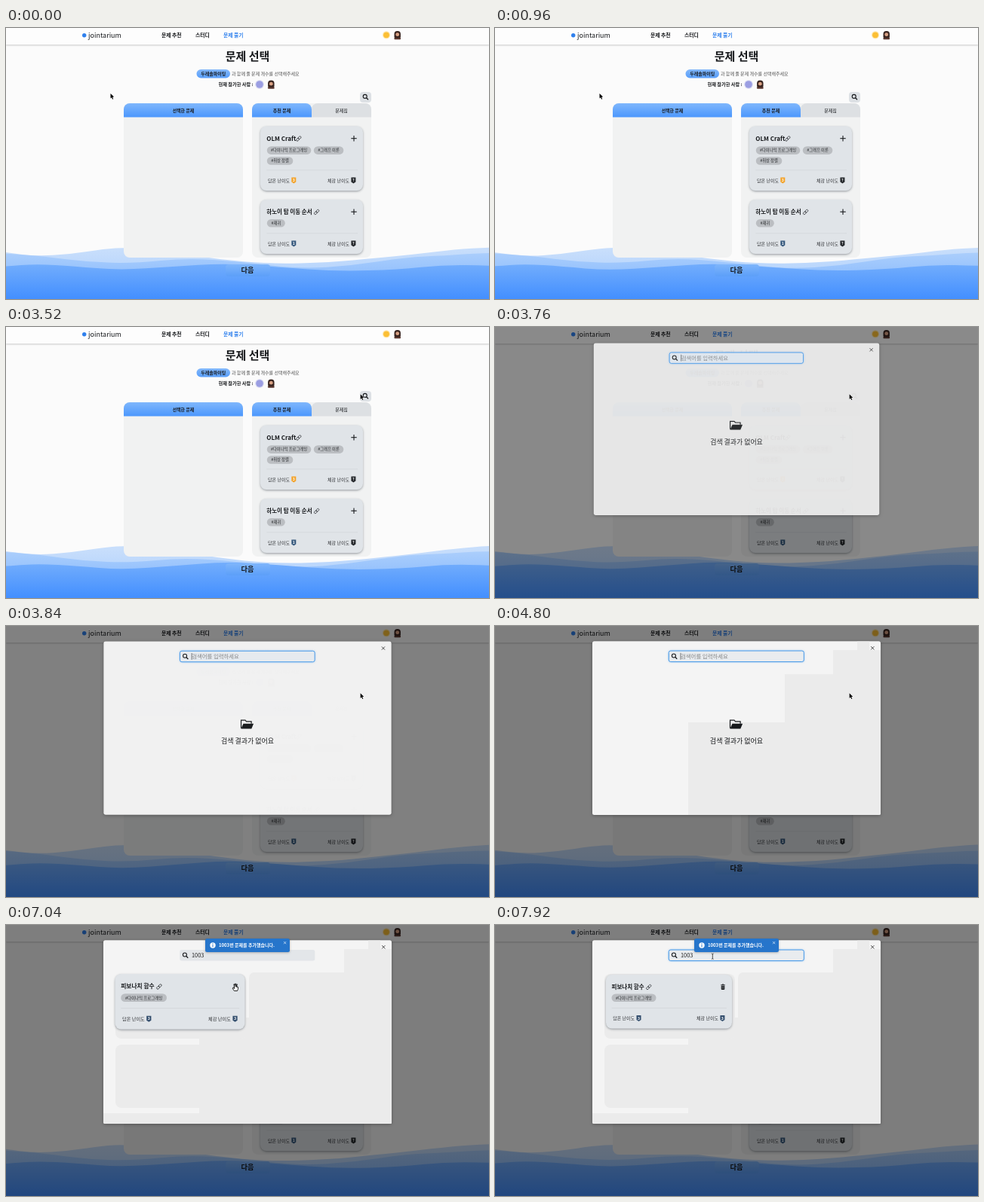
An HTML page with a canvas that plays this animation: 640 px wide and 360 px high, repeating every 8000 ms.

```html
<!DOCTYPE html>
<html lang="ko">
<head>
<meta charset="utf-8">
<title>문제 선택</title>
<style>
html, body { margin: 0; width: 100%; height: 100%; overflow: hidden; background: #fbfbfb; }
canvas { display: block; width: 100%; height: 100%; }
</style>
</head>
<body>
<canvas id="stage" width="640" height="360"></canvas>
<script>
const g = document.getElementById('stage').getContext('2d');
const LOOP = 8000, STEP = 80;
const FONT = '"Noto Sans CJK KR", "Noto Sans CJK", "Noto Sans CJK JP", "Noto Sans", sans-serif';
const INK = '#17191c', BLUE = '#2f80ed';

const clamp = v => Math.max(0, Math.min(1, v));
const part = (t, a, b) => clamp((t - a) / (b - a));
const easeOut = p => 1 - (1 - p) ** 3;
const easeInOut = p => p * p * (3 - 2 * p);
const mix = (a, b, p) => a + (b - a) * p;

function text(s, x, y, size, color = INK, weight = 500, align = 'left') {
  g.font = `${weight} ${size}px ${FONT}`;
  g.textAlign = align;
  g.textBaseline = 'alphabetic';
  g.fillStyle = color;
  g.fillText(s, x, y + size * 0.36);
}

function box(x, y, w, h, r, fill) {
  g.beginPath();
  g.roundRect(x, y, w, h, r);
  g.fillStyle = fill;
  g.fill();
}

function disc(x, y, r, fill) {
  g.beginPath();
  g.arc(x, y, r, 0, 7);
  g.fillStyle = fill;
  g.fill();
}

function line(pts, color, width = 1) {
  g.beginPath();
  pts.forEach(([x, y]) => g.lineTo(x, y));
  g.strokeStyle = color;
  g.lineWidth = width;
  g.stroke();
}

function shadow(color, blur, dy = 0) {
  g.shadowColor = color;
  g.shadowBlur = blur;
  g.shadowOffsetY = dy;
}
const noShadow = () => shadow('transparent', 0);

function vertical(y0, y1, a, b) {
  const v = g.createLinearGradient(0, y0, 0, y1);
  v.addColorStop(0, a);
  v.addColorStop(1, b);
  return v;
}

function scaledAt(x, y, k, draw) {
  g.save();
  g.translate(x, y);
  g.scale(k, k);
  g.translate(-x, -y);
  draw();
  g.restore();
}

// Icons
function magnifier(x, y) {
  g.beginPath();
  g.arc(x - 0.7, y - 0.7, 2.5, 0, 7);
  g.strokeStyle = INK;
  g.lineWidth = 1.1;
  g.stroke();
  line([[x + 1.1, y + 1.1], [x + 3.6, y + 3.6]], INK, 1.3);
}

function plus(x, y) {
  line([[x - 3.7, y], [x + 3.7, y]], INK, 1.1);
  line([[x, y - 3.7], [x, y + 3.7]], INK, 1.1);
}

function cross(x, y, r, color, width) {
  line([[x - r, y - r], [x + r, y + r]], color, width);
  line([[x + r, y - r], [x - r, y + r]], color, width);
}

function link(x, y) {
  g.save();
  g.translate(x, y);
  g.rotate(-Math.PI / 4);
  g.strokeStyle = '#33363a';
  g.lineWidth = 0.8;
  for (const dx of [-3.9, -0.3]) {
    g.beginPath();
    g.roundRect(dx, -1.4, 4.2, 2.8, 1.4);
    g.stroke();
  }
  g.restore();
}

function trash(x, y) {
  box(x - 2.8, y - 3, 5.6, 1.1, 0.4, INK);
  box(x - 1.1, y - 3.8, 2.2, 1, 0.4, INK);
  box(x - 2.3, y - 1.5, 4.6, 5.2, 0.8, INK);
  for (const dx of [-0.9, 0.9]) line([[x + dx, y - 0.7], [x + dx, y + 2.8]], '#b9bdc1', 0.5);
}

function badge(x, y, mark, color) {
  g.beginPath();
  g.moveTo(x - 3, y - 3.8);
  g.lineTo(x + 3, y - 3.8);
  g.lineTo(x + 3, y + 2.2);
  g.lineTo(x, y + 4);
  g.lineTo(x - 3, y + 2.2);
  g.closePath();
  g.fillStyle = color;
  g.fill();
  text(mark, x, y - 0.2, 5.2, '#fff', 700, 'center');
}

function folder(x, y) {
  g.beginPath();
  [[-8, 5], [-8, -5.5], [-2.5, -5.5], [-1, -3.8], [5.6, -3.8], [5.6, -1]].forEach(([a, b]) => g.lineTo(x + a, y + b));
  g.strokeStyle = INK;
  g.lineWidth = 1.2;
  g.stroke();
  g.beginPath();
  [[-5, -1], [8.6, -1], [5.8, 5.8], [-8.2, 5.8]].forEach(([a, b]) => g.lineTo(x + a, y + b));
  g.fillStyle = INK;
  g.fill();
}

function portrait(x, y) {
  box(x - 4.2, y - 5.5, 8.4, 10, [4, 4, 2.5, 2.5], '#38241f');
  disc(x, y - 0.8, 2.4, '#d9a184');
  box(x - 4.4, y + 3.4, 8.8, 2.4, 1.2, '#59372f');
}

// Page
function card(x, y, w, h, c) {
  shadow('rgba(50,60,70,.45)', 3, 1.2);
  box(x, y, w, h, 8, '#e0e4e8');
  noShadow();
  const left = x + c.pad, right = x + w - 12;
  text(c.title, left, y + 16.2, c.size, INK, 700);
  link(left + c.linkAt, y + 16.5);
  (c.added ? trash : plus)(right, y + 16.2);
  for (const [s, cx, cy, cw] of c.tags) {
    box(left + cx, y + cy, cw, 10.6, 5.3, '#bbbec2');
    text(s, left + cx + cw / 2, y + cy + 5.2, 5.3, '#292b2e', 500, 'center');
  }
  const foot = y + h - 13.6;
  line([[left, foot - 13.6], [right + 5, foot - 13.6]], '#d0d3d7', 0.7);
  text('담온 난이도', left + 1.7, foot, 6, '#303236');
  badge(left + 36, foot, c.rank, c.tone);
  text('체감 난이도', right - 35, foot, 6, '#303236');
  badge(right - 0.6, foot, c.feel, c.feelTone);
}

const FIRST = {
  title: 'OLM Craft', size: 8, pad: 8.3, linkAt: 42.5, rank: '3', tone: '#f3a32b', feel: '?', feelTone: '#25282c',
  tags: [['#다이나믹 프로그래밍', 0.5, 26.8, 58.5], ['#그래프 이론', 62.5, 26.8, 39.5], ['#위상 정렬', 0.5, 40.7, 34.5]]
};
const SECOND = {
  title: '하노이 탑 이동 순서', size: 7.5, pad: 8.3, linkAt: 66.3, rank: '1', tone: '#3b5d80', feel: '?', feelTone: '#25282c',
  tags: [['#재귀', 0.5, 26, 24]]
};
const FOUND = {
  title: '피보나치 함수', size: 7.5, pad: 7.5, linkAt: 49.2, rank: '3', tone: '#344f6e', feel: '3', feelTone: '#344f6e',
  tags: [['#다이나믹 프로그래밍', 0, 25.5, 59]]
};

const WAVES = [
  { pts: [[-40, 293], [0, 298], [40, 303], [85, 300], [130, 293], [160, 291], [210, 296], [280, 307], [350, 314], [430, 312], [490, 306], [540, 301], [595, 294], [640, 291], [680, 290]], top: 'rgba(148,193,252,.5)', end: 'rgba(100,166,255,.6)' },
  { pts: [[-40, 297], [0, 299], [50, 303], [110, 311], [170, 313], [240, 306], [310, 311], [390, 320], [460, 315], [530, 304], [580, 302], [640, 298], [680, 300]], top: 'rgba(148,193,252,.5)', end: 'rgba(90,160,255,.6)' },
  { pts: [[-40, 320], [0, 317], [40, 314], [90, 317], [150, 322], [220, 317], [290, 312], [360, 317], [440, 323], [520, 321], [580, 315], [640, 316], [680, 318]], top: '#85b9fb', end: '#438fff' }
];

function wave({ pts, top, end }, i, t) {
  const a = t / LOOP * Math.PI * 2 + i * 2;
  const dx = Math.sin(a) * 3 - Math.sin(i * 2) * 3;
  const p = pts.map(([x, y]) => [x + dx, y + 0.6 * Math.sin(a + x / 90)]);
  g.beginPath();
  g.moveTo(-60, 360);
  g.lineTo(...p[0]);
  for (let k = 1; k < p.length - 1; k++) {
    g.quadraticCurveTo(...p[k], (p[k][0] + p[k + 1][0]) / 2, (p[k][1] + p[k + 1][1]) / 2);
  }
  g.lineTo(700, 300);
  g.lineTo(700, 360);
  g.fillStyle = vertical(295, 360, top, end);
  g.fill();
}

function header() {
  shadow('rgba(0,0,0,.2)', 2, 0.5);
  box(0, 0, 640, 22, 0, '#fdfdfd');
  noShadow();
  disc(103.7, 9.8, 2.7, BLUE);
  text('jointarium', 109, 9.3, 9, INK, 500);
  text('문제 추천', 206, 9.5, 6.8, INK, 700);
  text('스터디', 251, 9.5, 6.8, INK, 700);
  text('문제 풀기', 288, 9.5, 6.8, BLUE, 700);
  disc(504, 9.3, 5.2, '#ffeab8');
  disc(504, 9.3, 3.9, '#fbbf35');
  portrait(518.7, 9.5);
}

function page(t) {
  g.fillStyle = '#fbfbfb';
  g.fillRect(0, 0, 640, 360);
  WAVES.forEach((w, i) => wave(w, i, t));
  header();
  text('문제 선택', 320, 38, 15, INK, 700, 'center');
  box(252.5, 55, 44.5, 11.5, 5.7, vertical(55, 66, '#83b8fb', '#5a9ffa'));
  text('두레솔파이팅', 274.7, 60.8, 6, INK, 700, 'center');
  text('과 함께 풀 문제 개수를 선택해주세요', 299, 60.8, 6, '#555');
  text('현재 참가한 사람 :', 281.5, 75, 6.2, INK, 700);
  disc(336, 75, 6, '#dfe1f3');
  disc(336, 75, 4.8, '#9b9ee2');
  portrait(351.3, 75);

  box(469, 85, 15, 14, 4, '#dde1e5');
  magnifier(476.4, 91.6);
  const tab = vertical(100, 118, '#7fb7fc', '#4d98fd');
  for (const x of [156, 326]) box(x, 100, 158, 205, 8, '#f1f2f2');
  box(156, 100, 158, 18.5, [8, 8, 0, 0], tab);
  box(405, 100, 79, 18.5, [8, 8, 0, 0], '#dde0e3');
  box(326, 100, 79, 18.5, [8, 8, 0, 0], tab);
  text('선택한 문제', 235, 110, 5.9, INK, 700, 'center');
  text('추천 문제', 365.5, 110, 6, INK, 700, 'center');
  text('문제집', 444.5, 110, 6, INK, 500, 'center');
  card(337, 130.5, 136, 85.5, FIRST);
  card(337, 228, 136, 72, SECOND);

  box(291, 314, 59, 16, 4, vertical(314, 330, '#7eb5fb', '#5c9ff9'));
  text('다음', 320, 321.5, 9.2, INK, 700, 'center');
}

// Dialog
const KEYS = [4960, 5040, 5120, 5200];
const LOAD = 5440, RESULT = 5680, ADD = 6800, REFOCUS = 7600;

function field(t, focused) {
  const typed = '1003'.slice(0, KEYS.filter(k => t >= k).length);
  if (focused) shadow('rgba(60,150,240,.7)', 3);
  box(230.3, 33, 179, 14.5, 2.5, focused ? '#e9ecef' : '#e3e6e9');
  noShadow();
  if (focused) {
    g.strokeStyle = '#4a9be8';
    g.lineWidth = 1;
    g.stroke();
  }
  magnifier(237.6, 40.2);
  if (typed) text(typed, 246, 40.2, 7.4, '#222', 400);
  else text('검색어를 입력하세요', 246, 40.2, 7.4, '#858789', 400);
  if (focused && t < 6640) {
    const x = typed ? 246.4 + g.measureText(typed).width : 246;
    line([[x, 35.8], [x, 44.6]], '#222', 0.6);
  }
}

function shade(t, bottom) {
  const c = '#ebebeb';
  box(480, 20.5, 16, 12, 0, c);
  box(448, 32, 63, 32, 0, c);
  if (t < LOAD) {
    box(384, 64, 127, 64, 0, c);
    box(256, 128, 255, bottom - 128, [0, 0, 2, 0], c);
    return;
  }
  box(322, 63, 189, bottom - 63, [7, 0, 2, 0], c);
  box(256, 123, 255, bottom - 123, [0, 0, 2, 0], c);
  box(145, 65, 173, 86, 8, c);
  box(145, 159, 113, 84, [8, 0, 0, 8], c);
  box(129, 250, 382, bottom - 250, [0, 0, 2, 2], c);
}

function results(t) {
  if (t < RESULT) {
    const tone = `rgba(214,216,218,${0.5 + 0.2 * Math.sin(t / 120)})`;
    for (const x of [145, 322]) for (const y of [65, 159]) box(x, y, 173, 85, 8, tone);
    return;
  }
  const k = 1 + 0.03 * (easeInOut(part(t, 6560, 6720)) - easeInOut(part(t, 7280, 7440)));
  g.save();
  g.globalAlpha *= part(t, RESULT - 80, RESULT + 80);
  scaledAt(230.5, 101.5, k, () => card(147, 66, 167, 71.5, { ...FOUND, added: t >= ADD }));
  g.restore();
}

function dialog(t) {
  const p = easeOut(part(t, 3520, 3960));
  if (!p) return;
  g.fillStyle = `rgba(0,0,0,${0.5 * p})`;
  g.fillRect(0, 0, 640, 360);
  const bottom = mix(251, 264, easeInOut(part(t, LOAD, LOAD + 160)));
  g.save();
  g.globalAlpha = p;
  scaledAt(320, 136, 0.9 + 0.1 * p, () => {
    shadow('rgba(0,0,0,.3)', 4, 1);
    box(129, 20.3, 382, bottom - 20.3, 2.5, '#f4f4f4');
    noShadow();
    if (t >= 4000) shade(t, bottom);
    field(t, t < ADD || t >= REFOCUS);
    cross(500.3, 29.3, 2.1, '#333', 0.9);
    if (t < LOAD) {
      folder(319.5, 130.7);
      text('검색 결과가 없어요', 320, 153, 9, INK, 500, 'center');
    } else results(t);
  });
  g.restore();
}

function toast(t) {
  const p = easeOut(part(t, ADD, ADD + 240));
  if (!p) return;
  g.save();
  g.translate(0, -40 * (1 - p));
  g.globalAlpha = p;
  shadow('rgba(0,0,0,.25)', 3, 1);
  box(264, 18, 112, 18, 2.5, '#2675cb');
  noShadow();
  disc(274, 27, 3.7, '#fff');
  box(273.5, 26.2, 1, 3, 0, '#2675cb');
  disc(274, 24.9, 0.65, '#2675cb');
  text('1003번 문제를 추가했습니다.', 282, 27, 6, '#fff', 700);
  cross(369.6, 23.6, 1.6, '#dbe9f8', 0.8);
  g.restore();
}

// Pointer
function arrow(x, y) {
  g.beginPath();
  [[0, 0], [0, 6.6], [1.5, 5.2], [2.6, 7.7], [3.7, 7.2], [2.6, 4.8], [4.6, 4.6]].forEach(([a, b]) => g.lineTo(x + a, y + b));
  g.closePath();
  g.strokeStyle = '#fff';
  g.lineWidth = 1;
  g.stroke();
  g.fillStyle = '#000';
  g.fill();
}

function hand(x, y) {
  g.beginPath();
  [[-1.4, -3.6], [0, -3.6], [0.3, -0.7], [3.5, 0], [3.4, 2.8], [2.5, 5], [-1.6, 5], [-4, 1.5], [-3.2, 0.7], [-1.5, 2]].forEach(([a, b]) => g.lineTo(x + a, y + b));
  g.closePath();
  g.fillStyle = '#fff';
  g.fill();
  g.strokeStyle = '#111';
  g.lineWidth = 0.9;
  g.stroke();
}

function ibeam(x, y) {
  line([[x, y - 3.2], [x, y + 3.2]], '#222', 0.8);
  for (const s of [-1, 1]) line([[x - 1.4, y + s * 3.8], [x, y + s * 3], [x + 1.4, y + s * 3.8]], '#222', 0.7);
}

function pointer(t) {
  if (t >= KEYS[0] && t < 6320) return;
  if (t < 6320) {
    const p = easeInOut(part(t, 2560, 3360));
    arrow(mix(138.5, 469.6, p), mix(87, 89.3, p));
    return;
  }
  const p = easeInOut(part(t, 6320, 6720)), q = easeInOut(part(t, 7200, 7600));
  const x = mix(mix(469.6, 304, p), 288.3, q), y = mix(mix(89.3, 82.5, p), 41.7, q);
  if (y < 48) ibeam(x, y);
  else if (p > 0.97 && q < 0.1) hand(x, y);
  else arrow(x, y);
}

function frame() {
  const t = Math.floor(performance.now() % LOOP / STEP) * STEP;
  page(t);
  dialog(t);
  toast(t);
  pointer(t);
  requestAnimationFrame(frame);
}
frame();
</script>
</body>
</html>
```
